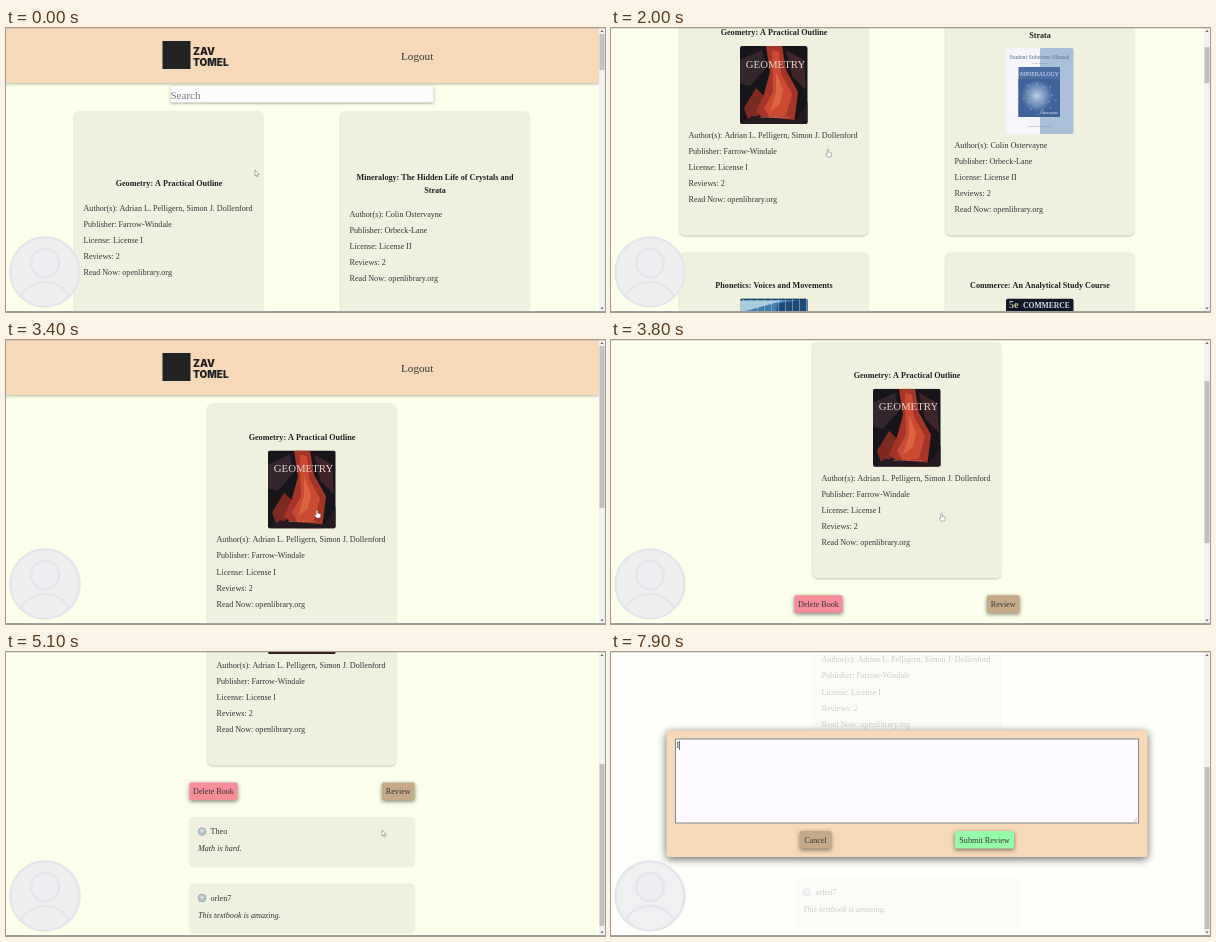
Write an HTML page with a canvas that moves like this. It is 599 by 284 pixels and loops after 8 s.

```html
<!DOCTYPE html>
<html lang="en">
<head>
<meta charset="utf-8">
<title>Textbook reviews</title>
<style>
  html, body { margin: 0; height: 100%; overflow: hidden; background: #fcffea; }
  canvas { display: block; width: 599px; height: 284px; }
</style>
</head>
<body>
<canvas width="599" height="284"></canvas>
<script>
const ctx = document.querySelector('canvas').getContext('2d');
const SERIF = '"Liberation Serif", serif';
const SANS = 'Inter, sans-serif';
const BODY = 8.15;
const PAGE = '#fcffea', CARD = '#eff0de', PEACH = '#f5d9b9', TAN = '#c5aa8a', INK = '#363636';

// Keyframes: [time, value...], linear between neighbours.
const LIST_SCROLL = [[400, 0], [1300, 40], [2000, 112]];
const DETAIL_SCROLL = [[3400, 0], [4300, 139], [5100, 186.5], [5300, 192]];
const POINTER = [[0, 249, 142], [100, 249, 161], [400, 249, 161], [1300, 292, 161],
  [2000, 217, 121], [2400, 217, 121], [3400, 311, 170], [4300, 355, 177],
  [5100, 376, 178], [5600, 376, 178], [6300, 392, 134]];
const LIST_END = 2500, MODAL_START = 6500, FOCUS = 7000, TYPED = 7700;

const clamp = v => Math.max(0, Math.min(1, v));

function track(keys, t) {
  const next = keys.findIndex(k => k[0] > t);
  if (next === 0) return keys[0].slice(1);
  if (next < 0) return keys.at(-1).slice(1);
  const a = keys[next - 1], b = keys[next];
  const p = (t - a[0]) / (b[0] - a[0]);
  return a.slice(1).map((v, i) => v + (b[i + 1] - v) * p);
}

function rect(x, y, w, h, color) {
  ctx.fillStyle = color;
  ctx.fillRect(x, y, w, h);
}

function panel(x, y, w, h, radius, color, shadow = 0, blur = 2, drop = 1) {
  ctx.save();
  ctx.shadowColor = `rgba(0,0,0,${shadow})`;
  ctx.shadowBlur = blur;
  ctx.shadowOffsetY = drop;
  ctx.fillStyle = color;
  ctx.beginPath();
  ctx.roundRect(x, y, w, h, radius);
  ctx.fill();
  ctx.restore();
}

function shape(color, ...points) {
  ctx.fillStyle = color;
  ctx.beginPath();
  points.forEach(p => ctx.lineTo(...p));
  ctx.closePath();
  ctx.fill();
}

function circle(x, y, r, fill, stroke, width = 1) {
  ctx.beginPath();
  ctx.arc(x, y, r, 0, 7);
  if (fill) { ctx.fillStyle = fill; ctx.fill(); }
  if (stroke) { ctx.strokeStyle = stroke; ctx.lineWidth = width; ctx.stroke(); }
}

// y is the middle of the lowercase letters.
function text(str, x, y, { size = BODY, style = '', color = INK, align = 'left', family = SERIF } = {}) {
  ctx.font = `${style} ${size}px ${family}`;
  ctx.fillStyle = color;
  ctx.textAlign = align;
  ctx.fillText(str, x, y + size * 0.33);
}

function geometryCover() {
  rect(0, 0, 68, 78, '#17141a');
  shape('#33272d', [0, 14], [22, 4], [26, 22], [10, 40], [0, 38]);
  shape('#3d2529', [46, 4], [64, 14], [66, 44], [52, 30]);
  shape('#7d2a22', [4, 62], [16, 42], [24, 50], [18, 70], [8, 74]);
  shape('#a53526', [26, 0], [42, 0], [46, 24], [58, 46], [54, 78], [30, 78], [16, 66], [24, 48], [30, 26]);
  shape('#cb4a32', [32, 4], [39, 6], [41, 28], [52, 48], [46, 70], [30, 72], [24, 62], [33, 46]);
  shape('#dc6343', [36, 26], [43, 44], [40, 58], [30, 66], [36, 46]);
  shape('#241a1f', [0, 78], [12, 70], [56, 74], [68, 56], [68, 78]);
  text('GEOMETRY', 35.5, 18, { size: 10.8, color: '#e2d3ca', align: 'center' });
  text('ADRIAN L. PELLIGERN', 34, 71, { size: 2.8, color: '#d8b4a4', align: 'center' });
}

function mineralogyCover() {
  rect(0, 0, 34, 86, '#f6f6fa');
  rect(34, 0, 34, 86, '#a9bfda');
  text('Student Solutions Manual', 33.5, 9.5, { size: 5.8, color: '#5a6c88', align: 'center' });
  text('to accompany', 34, 15.5, { size: 2.8, color: '#7685a0', align: 'center' });
  rect(12.5, 19, 41.5, 50, '#4c6da3');
  rect(12.5, 31, 41.5, 38, '#3f6299');
  text('MINERALOGY', 33.5, 26, { size: 5.8, color: '#dfe8f4', align: 'center' });
  const glow = ctx.createRadialGradient(31, 48, 0, 31, 48, 16);
  glow.addColorStop(0, '#b9cee4');
  glow.addColorStop(1, '#b9cee400');
  rect(12.5, 31, 41.5, 38, glow);
  for (let i = 0; i < 22; i++) {
    const a = i * 2.4, r = 3.7 * Math.sqrt(i);
    circle(33 + r * Math.cos(a), 50 + r * Math.sin(a), 0.7, '#8eabd0');
  }
  text('Ostervayne', 43, 65, { size: 4, color: '#e3eaf4', align: 'center' });
  text('prepared for students', 34, 78, { size: 2.8, color: '#7685a0', align: 'center' });
}

function phoneticsCover() {
  rect(0, 0, 68, 80, '#3f7fb0');
  shape('#a9cbdd', [0, 2], [44, 2], [0, 14]);
  shape('#1f4a78', [38, 5], [68, 0], [68, 80], [20, 80]);
  rect(0, 0, 68, 1.5, '#1c3c60');
  for (let x = 3; x < 68; x += 7) rect(x, 0, 1, 80, '#a9cde088');
}

function commerceCover() {
  rect(0, 0, 68, 80, '#101828');
  text('5e', 3, 6.5, { size: 10, style: 'bold', color: '#c9cba4' });
  text('COMMERCE', 17, 6.5, { size: 7.6, style: 'bold', color: '#d5dde8' });
  rect(0, 13, 68, 67, '#345072');
}

const details = (authors, publisher, license) => [
  `Author(s): ${authors}`, `Publisher: ${publisher}`, `License: License ${license}`,
  'Reviews: 2', 'Read Now: openlibrary.org'];

const geometry = {
  title: ['Geometry: A Practical Outline'], cover: geometryCover, coverHeight: 78, loadedAt: 800,
  lines: details('Adrian L. Pelligern, Simon J. Dollenford', 'Farrow-Windale', 'I')
};
const mineralogy = {
  title: ['Mineralogy: The Hidden Life of Crystals and', 'Strata'],
  cover: mineralogyCover, coverHeight: 86, loadedAt: 1500,
  lines: details('Colin Ostervayne', 'Orbeck-Lane', 'II')
};
const phonetics = {
  title: ['Phonetics: Voices and Movements'], cover: phoneticsCover, coverHeight: 80, loadedAt: 1500, lines: []
};
const commerce = {
  title: ['Commerce: An Analytical Study Course'], cover: commerceCover, coverHeight: 80, loadedAt: 1500, lines: []
};

// Card contents are centred vertically, so a loaded cover pushes title and details apart.
function bookCard(book, x, y, t) {
  panel(x, y, 188.5, 236.5, 5, CARD, 0.22);
  const coverHeight = t >= book.loadedAt ? book.coverHeight : 0;
  const spread = 6 * (book.title.length - 1) + coverHeight / 2;
  const top = y + 72 - spread;
  book.title.forEach((line, i) =>
    text(line, x + 94.5, top + 0.6 + 12.3 * i, { style: 'bold', color: '#202020', align: 'center' }));
  book.lines.forEach((line, i) => text(line, x + 9, y + 97.2 + spread + 16.1 * i));
  if (!coverHeight) return;
  ctx.save();
  ctx.translate(x + 60.5, top + 12 * (book.title.length - 1) + 14);
  ctx.beginPath();
  ctx.roundRect(0, 0, 67.5, coverHeight, 2);
  ctx.clip();
  book.cover();
  ctx.restore();
}

function header() {
  panel(0, -5, 593, 60, 0, PEACH, 0.3, 3, 1);
  rect(156.5, 13, 28, 28, '#222');
  const brand = { size: 10, style: '900', color: '#222', family: SANS };
  text('ZAV', 187, 23.5, brand);
  text('TOMEL', 187, 34.6, brand);
  text('Logout', 395, 28, { size: 11.2 });
}

function listPage(t) {
  header();
  panel(164.5, 58, 263, 16.5, 1, '#fdfbfe', 0.35, 3, 1);
  text('Search', 164.5, 67.3, { size: 11, color: '#777' });
  bookCard(geometry, 68.5, 83, t);
  bookCard(mineralogy, 334.5, 83, t);
  bookCard(phonetics, 68.5, 336.5, t);
  bookCard(commerce, 334.5, 336.5, t);
}

function button(label, x, y, w, color) {
  panel(x, y, w, 17.5, 1.5, color, 0.5, 4, 1.5);
  text(label, x + w / 2, y + 9, { align: 'center' });
}

function review(name, quote, y) {
  panel(183.5, y, 225, 49, 4, CARD, 0.08);
  circle(196, y + 14.5, 3.8, '#b9c6cc', '#8fa0aa', 0.8);
  circle(196, y + 13.5, 1.5, '#e2e6df');
  text(name, 204.5, y + 14.5);
  text(quote, 192, y + 31.5, { style: 'italic' });
}

function detailPage(t) {
  header();
  bookCard(geometry, 201.5, 63.5, t);
  button('Delete Book', 183.5, 317, 48, '#f68d98');
  button('Review', 376, 317, 32.5, TAN);
  review('Theo', 'Math is hard.', 351.5);
  review('orlen7', 'This textbook is amazing.', 418);
}

function modal(t) {
  const opacity = clamp((t - MODAL_START) / 200);
  if (!opacity) return;
  ctx.save();
  ctx.globalAlpha = opacity;
  rect(0, 0, 593, 284, 'rgba(255,255,255,.75)');
  panel(55.5, 78.5, 481, 126.5, 3, PEACH, 0.6, 9, 2);
  rect(64, 86.5, 464, 85, t >= FOCUS ? '#808890' : '#a0a0a0');
  rect(65, 87.5, 462, 83, '#fdfbff');
  ctx.strokeStyle = '#999';
  ctx.lineWidth = 0.6;
  ctx.beginPath();
  ctx.moveTo(522.5, 169.5); ctx.lineTo(526, 166);
  ctx.moveTo(524.5, 169.5); ctx.lineTo(526, 168);
  ctx.stroke();
  button('Cancel', 189, 179, 31, TAN);
  button('Submit Review', 344, 179, 59, '#95fba9');
  if (t >= TYPED) text('I', 65.5, 93.5);
  if (t >= 7300) rect(t >= TYPED ? 68 : 66, 89, 0.7, 9, '#333');
  ctx.restore();
}

function profileBubble() {
  const line = '#e4e6ea';
  circle(39, 244, 35.5, 'rgba(237,239,241,.93)');
  ctx.save();
  ctx.beginPath();
  ctx.arc(39, 244, 34, 0, 7);
  ctx.clip();
  ctx.beginPath();
  ctx.ellipse(39, 277, 26, 23, 0, Math.PI, 0);
  ctx.strokeStyle = line;
  ctx.lineWidth = 2.5;
  ctx.stroke();
  ctx.restore();
  circle(39, 235, 14, '#edeff2', line, 2.5);
  circle(39, 244, 34.5, null, line, 2.5);
}

function scrollbar(top, height) {
  rect(593, 0, 6, 284, '#f1f1f1');
  rect(593.5, top, 5, height, '#c0c0c0');
  shape('#606060', [594.5, 4], [596, 2], [597.5, 4]);
  shape('#606060', [594.5, 279.5], [596, 281.5], [597.5, 279.5]);
}

function pointer(t) {
  if (t >= MODAL_START + 100) return;
  const [x, y] = track(POINTER, t);
  const hand = (t >= 1700 && t < 4600) || t >= 6200;
  ctx.save();
  ctx.translate(x, y);
  ctx.scale(0.8, 0.8);
  ctx.strokeStyle = '#777';
  ctx.lineWidth = 0.7;
  const outline = hand
    ? 'M-1 1Q0-.5 1 1V4L4.5 5V8L3.5 10H-.5L-3 6.5L-2 5.7L-1 6.5Z'
    : 'M0 0V7.5L1.7 6L2.8 8.8L4 8.3L2.9 5.6H5.2Z';
  const path = new Path2D(outline);
  ctx.fillStyle = '#fff';
  ctx.fill(path);
  ctx.stroke(path);
  ctx.restore();
}

function draw(t) {
  const onList = t < LIST_END;
  const [scroll] = track(onList ? LIST_SCROLL : DETAIL_SCROLL, t);
  rect(0, 0, 599, 284, PAGE);
  ctx.save();
  ctx.translate(0, -scroll);
  (onList ? listPage : detailPage)(t);
  ctx.restore();
  modal(t);
  if (onList) scrollbar(6 + scroll * 0.118, 36);
  else scrollbar(6 + scroll * 0.568, 162);
  profileBubble();
  rect(0, 0, 599, 1, 'rgba(120,120,120,.2)');
  rect(0, 283, 599, 1, '#a0a09c');
  pointer(t);
}

function frame() {
  const t = performance.now() % 8000;
  draw(Math.floor(t / 100) * 100);
  requestAnimationFrame(frame);
}
frame();
</script>
</body>
</html>
```
